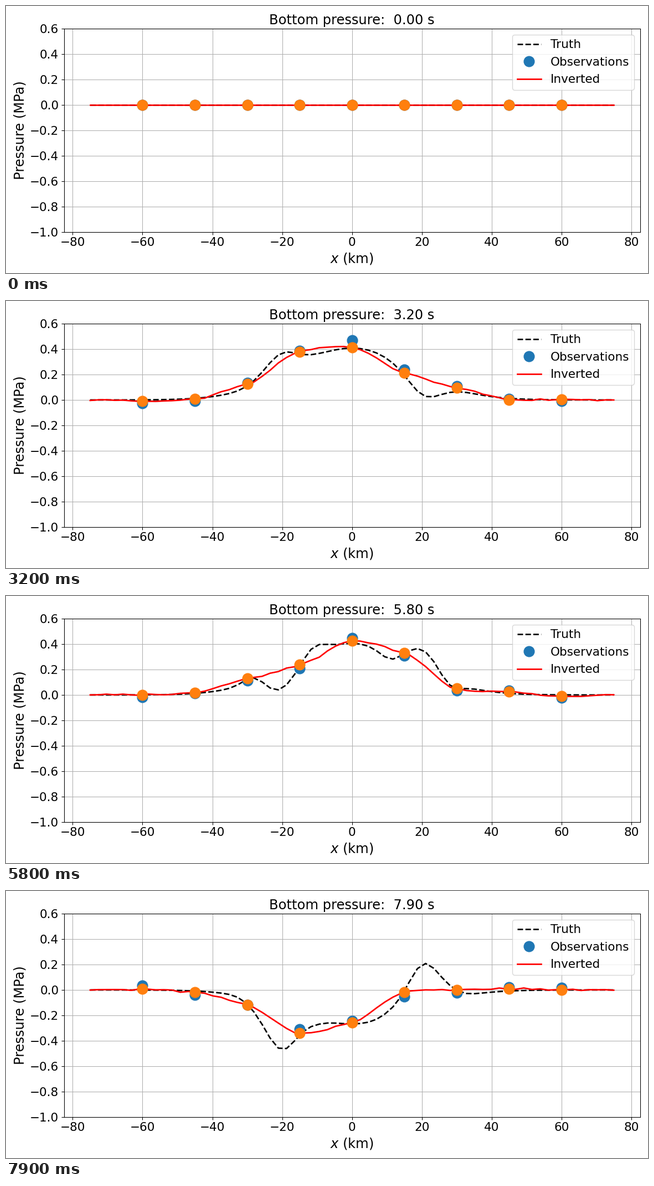
A matplotlib script for the animation above (8000 ms loop, 1159 by 483 pixels).

```python
import numpy as np
import matplotlib.pyplot as plt
from matplotlib.animation import FuncAnimation

W, H, DPI = 1159, 483, 96.6
FRAMES, INTERVAL = 80, 100

GRID = np.linspace(-75, 75, 65)
GAUGES = np.linspace(-60, 60, 9)

# Time (s) and strength (MPa) of the uplift, the edge waves and their shoulders.
KEY_TIMES = [0, 1.8, 3.2, 4.3, 5.1, 6.5, 7.9]
UPLIFT = [0, 0.260, 0.408, 0.467, 0.475, 0.260, -0.267]
EDGES = [0, 0.195, 0.165, 0.026, -0.088, -0.212, -0.335]
SHOULDERS = [0, -0.015, 0.008, 0.045, 0.060, 0.055, -0.026]


def hermite(x, xp, fp, tension=0.0):
    """Cubic interpolation; a tension of 1 flattens every knot."""
    xp, fp = np.asarray(xp, float), np.asarray(fp, float)
    slope = (1 - tension) * np.gradient(fp, xp)
    i = np.clip(np.searchsorted(xp, x, side="right") - 1, 0, len(xp) - 2)
    h = xp[i + 1] - xp[i]
    s = (x - xp[i]) / h
    return ((1 + 2 * s) * (1 - s) ** 2 * fp[i] + s * (1 - s) ** 2 * h * slope[i]
            + s * s * (3 - 2 * s) * fp[i + 1] + s * s * (s - 1) * h * slope[i + 1])


def bump(x, center, width):
    return np.exp(-0.5 * ((x - center) / width) ** 2)


def truth_at(x):
    """Pressure at x for all frames: an even uplift plus odd waves at its edges."""
    r, side = np.abs(x), -np.sign(x)
    return (np.outer(uplift, bump(x, 0, 17.1))
            + np.outer(edges, side * bump(r, 20.4, 4.5))
            + np.outer(shoulders, side * (bump(r, 11, 3) + bump(r, 28, 3))))


def remember(noise, keep, gain):
    """Low-pass filter over the frames, starting from rest."""
    out = np.zeros_like(noise)
    for i in range(1, len(noise)):
        out[i] = keep * out[i - 1] + gain * noise[i]
    return out


clock = np.arange(FRAMES) * INTERVAL / 1000
uplift, edges, shoulders = (hermite(clock, KEY_TIMES, strength)
                            for strength in (UPLIFT, EDGES, SHOULDERS))

rng = np.random.default_rng(4)
noise = np.clip(rng.normal(0, 0.032, (FRAMES, GAUGES.size)), -0.06, 0.06)
noise[0] = 0
ripple = remember(rng.normal(0, 0.0025, (FRAMES, GRID.size)), 0.9, 0.6)

truth = truth_at(GRID)
observed = truth_at(GAUGES) + noise

# The inversion follows the readings at the gauges and is smooth between them.
estimate = truth_at(GAUGES) + remember(noise, 0.65, 0.3)
knots = np.r_[-75, GAUGES, 75]
inverted = np.array([hermite(GRID, knots, np.r_[0, row, 0], tension=0.5)
                     for row in estimate]) + ripple

fig = plt.figure(figsize=((W + 0.001) / DPI, (H + 0.001) / DPI), dpi=DPI,
                 facecolor="white")
left, right, top, bottom = 104.7, 1144.5, 41, 409
ax = fig.add_axes([left / W, 1 - bottom / H, (right - left) / W, (bottom - top) / H])
ax.set_xlim(-82.5, 82.5)
ax.set_ylim(-1, 0.6)
ax.set_xticks(np.arange(-80, 81, 20))
ax.set_yticks(np.linspace(-1, 0.6, 9))
ax.tick_params(labelsize=16)
ax.set_xlabel("$x$ (km)", fontsize=18)
ax.set_ylabel("Pressure (MPa)", fontsize=18)
ax.grid(True)
title = ax.set_title("", fontsize=18)

truth_line, = ax.plot([], [], "k--", lw=2, label="Truth")
gauge_dots, = ax.plot([], [], "o", color="tab:blue", ms=14, label="Observations")
inverted_line, = ax.plot([], [], "r-", lw=2, label="Inverted")
model_dots, = ax.plot([], [], "o", color="tab:orange", ms=14)
ax.legend(loc="upper right", fontsize=16, labelspacing=0.53)


def draw(i):
    truth_line.set_data(GRID, truth[i])
    gauge_dots.set_data(GAUGES, observed[i])
    inverted_line.set_data(GRID, inverted[i])
    model_dots.set_data(GAUGES, np.interp(GAUGES, GRID, inverted[i]))
    title.set_text(f"Bottom pressure: {clock[i]:5.2f} s")
    return truth_line, gauge_dots, inverted_line, model_dots, title


anim = FuncAnimation(fig, draw, frames=FRAMES, interval=INTERVAL,
                     repeat=True, repeat_delay=0, blit=False)
plt.show()
```
